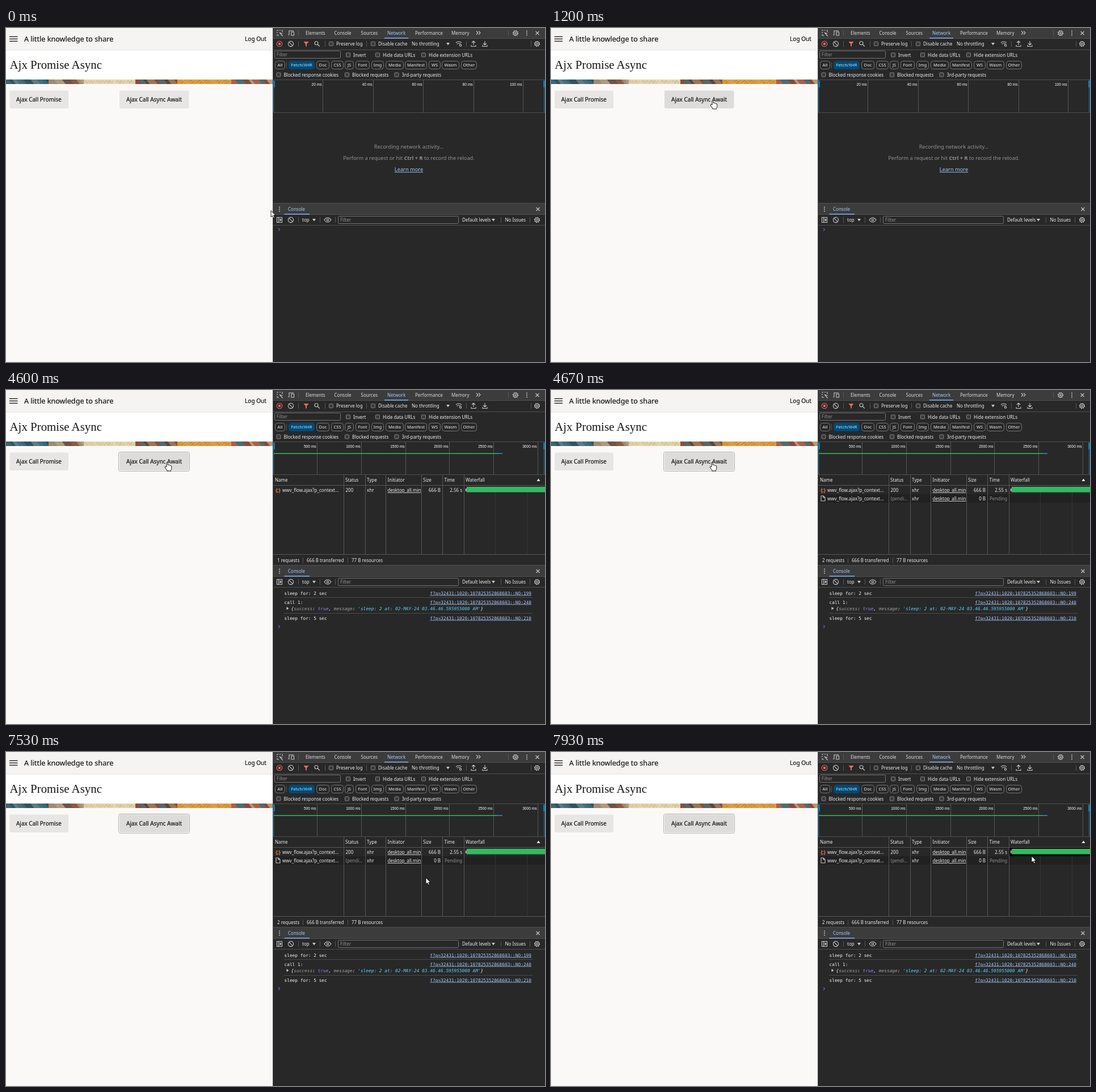
Animation, 950 px wide and 590 px high, one loop 8000 ms. Source, as an HTML page:

```html
<!DOCTYPE html>
<html lang="en">
<head>
<meta charset="utf-8">
<title>Ajx Promise Async</title>
<style>
html, body { margin: 0; width: 100%; height: 100%; overflow: hidden; background: #282828; }
svg { display: block; font: 8px "Noto Sans", "Open Sans", sans-serif; fill: #ececec; }
text { white-space: pre; }
.mono { font-family: "DejaVu Sans Mono", monospace; font-size: 7.82px; fill: #f4f4f4; }
.link { fill: #a8c7fa; text-decoration: underline; }
.dim { fill: #8f8f8f; }
.line { fill: none; stroke: #c7c7c7; stroke-width: 1.1; }
.rule { fill: none; }
.axis { font: 6.6px "Liberation Sans", Arial, sans-serif; fill: #fff; text-anchor: end; }
.end { text-anchor: end; }
.mid { text-anchor: middle; }
.page { fill: #161513; stroke: #161513; stroke-width: .2; }
.title { font: 20.9px "Liberation Serif", Times, serif; fill: #161513; }
</style>
</head>
<body>
<svg id="stage" width="950" height="590" viewBox="0 0 950 590"></svg>
<script>
const LOOP = 8000, STEP = 200 / 3;

const text = (x, y, s, cls = '', extra = '') => `<text x="${x}" y="${y}" class="${cls}" ${extra}>${s}</text>`;
const rect = (x, y, w, h, fill, extra = '') => `<rect x="${x}" y="${y}" width="${w}" height="${h}" fill="${fill}" ${extra}/>`;
const path = (d, extra = '') => `<path class="line" d="${d}" ${extra}/>`;
const rule = (d, color = '#565656') => `<path class="rule" d="${d}" stroke="${color}"/>`;
const ring = (x, y, r, extra = '') => `<circle class="line" cx="${x}" cy="${y}" r="${r}" ${extra}/>`;
const group = (id, body) => `<g id="${id}">${body}</g>`;
const each = (list, f) => list.map(f).join('');
const bars = (y, h, xs, color) => each(xs, x => rule(`M${x}.5 ${y}v${h}`, color));

// Toolbar icons and fields
const gear = (x, y) => ring(x, y, 3.5) + ring(x, y, 1.3) + ring(x, y, 4.6, 'stroke-dasharray="1.8 1.81"');
const cross = (x, y) => path(`M${x - 3} ${y - 3}l6 6m0 -6l-6 6`);
const dots = (x, y) => each([-3.5, 0, 3.5], d => `<circle cx="${x}" cy="${y + d}" r="1" fill="#c7c7c7"/>`);
const clear = (x, y) => ring(x, y, 4.6) + path(`M${x - 3.2} ${y - 3.2}l6.4 6.4`);
const drop = (x, y) => `<path d="M${x - 3} ${y - 2}h6l-3 4.5z" fill="#c7c7c7"/>`;
const tray = (x, arrow) => path(`M${x} 23v7${arrow}M${x - 4} 30v2.5h8v-2.5`);
const check = (x, y, label) => rect(x + .5, y - 3.5, 7, 7, '#3a3a3a', 'rx="1" stroke="#858585"') + text(x + 13, y + 3, label);
const field = (x, y, w) => rect(x + .5, y + .5, w, 13, '#282828', 'rx="2" stroke="#757575"') + text(x + 4, y + 9.7, 'Filter', 'dim');

function random(seed) {
  return () => (seed = (seed * 16807) % 2147483647) / 2147483647;
}

// Woven strip under the page title: leaning patches, or plain cloth with stitches
function banner() {
  const next = random(77);
  const zones = [
    [0, 75, ['#3d6671', '#33525d', '#5d7c80', '#456f79']],
    [75, 137, ['#a08a72', '#b09a80', '#6b5547', '#8c5a45']],
    [137, 228, ['#e3d2ac', '#e6d6b2'], '#b5a27c', 'q2 -7 4 -2t4 -2'],
    [228, 302, ['#85503c', '#56686a', '#5a463b', '#9a7457']],
    [302, 397, ['#dd9a42', '#e2a44c'], '#a8682f', 'l7 -5m-2 6l7 -5'],
    [397, 470, ['#a8614a', '#4d6c72', '#8a4a38', '#b39a7c']]
  ];
  let out = '';
  for (const [from, to, colors, thread, stitch] of zones) {
    out += rect(from, 91, to - from, 8, colors[0]);
    for (let x = from, i = 0; x < to; x += 5 + next() * 9, i++) {
      out += `<path d="M${x} 91H${to}V99H${Math.min(to, x + 6)}z" fill="${colors[i % colors.length]}"/>`;
      if (thread) out += path(`M${x} 97${stitch}`, `style="stroke:${thread};stroke-width:.6"`);
    }
  }
  return out;
}

const page = rect(0, 0, 470, 590, '#fbf9f8') + rect(0, 0, 470, 39, '#f5f4f2') +
  rect(0, 39, 470, 52, '#fff') + rect(0, 38.5, 470, 1, '#e3e1de') +
  each([15, 19, 23], y => rect(6, y - .3, 14.5, 1.3, '#161513')) +
  text(32, 24, 'A little knowledge to share', 'page', 'font-size="12.64"') +
  text(421, 23, 'Log Out', 'page', 'font-size="10.1"') +
  text(6.5, 72, 'Ajx Promise Async', 'title') +
  banner() +
  rect(6.5, 110.5, 103.5, 31.5, '#e8e6e4', 'rx="2"') +
  rect(198.5, 109.5, 125, 34, '#fbf9f8', 'id="focus" rx="3" stroke="#b4b2b0"') +
  rect(200, 110.5, 122.5, 31.5, '#e8e6e4', 'id="button" rx="2"') +
  text(18, 130, 'Ajax Call Promise', 'page', 'font-size="9.92"') +
  text(212, 130, 'Ajax Call Async Await', 'page', 'font-size="10"');

const tabs = [[528, 'Elements'], [578.5, 'Console'], [625.5, 'Sources'], [672, 'Network'], [721, 'Performance'], [785, 'Memory']];
const checks = [[569, 28, 'Preserve log'], [643, 28, 'Disable cache'], [599, 47.5, 'Invert'], [651, 47.5, 'Hide data URLs'],
  [732, 47.5, 'Hide extension URLs'], [476.5, 82.5, 'Blocked response cookies'], [597, 82.5, 'Blocked requests'],
  [684.5, 82.5, '3rd-party requests']];
const pills = [[474, 18, 'All'], [498, 46, 'Fetch/XHR'], [547, 23, 'Doc'], [573, 22, 'CSS'], [597, 16, 'JS'], [616, 25, 'Font'],
  [644, 22, 'Img'], [669, 32, 'Media'], [703, 39, 'Manifest'], [745, 21, 'WS'], [768, 31, 'Wasm'], [802, 28, 'Other']];

function pill([x, w, label]) {
  const on = label === 'Fetch/XHR', edge = on ? '#004a77' : '#757575';
  return rect(x + .5, 58.5, w - 1, 14, on ? edge : 'none', `rx="4" stroke="${edge}"`) +
    text(x + w / 2, 68.3, label, 'mid', `font-size="7.6" font-weight="500" fill="${on ? '#c2e7ff' : '#ececec'}"`);
}

const toolbars = rect(470, 0, 480, 590, '#282828') + rect(470, 0, 480, 18, '#3c3c3c') +
  rule('M470 18.5H950M470 38.5H950M470 91.5H950M470 149.5H950', '#4f4f4f') +
  each(tabs, ([x, s]) => text(x, 12, s, '', `fill="${s === 'Network' ? '#a8c7fa' : '#dcdcdc'}"`)) +
  rect(667, 17, 42, 1.5, '#7cacf8') +
  path('M481 13h-3v-2m0 -2v-2m0 -2v-1h2m2 0h2m2 0h1v3M487 14l-4.5 -5.5l5 1.5m-5 -1.5l5.5 6') +
  path('M500 12h-3M499 11v-6h8M503 7h4.5v6h-4.5z') +
  path('M829 5.5l3 3l-3 3m4 -6l3 3l-3 3') + gear(898, 9) + dots(918, 9) + cross(936.5, 9) +
  bars(4, 10, [515, 885]) +
  ring(482, 28, 4.8, 'style="stroke:#e46962"') + rect(480, 26, 4, 4, '#e46962') +
  clear(502, 28) + '<path d="M524.5 24h9l-3.5 4.5v4h-2v-4z" fill="#e46962"/>' +
  ring(547, 26.8, 3) + path('M549.3 29l3.5 3.5') +
  text(715, 31, 'No throttling') + drop(779, 28) +
  path('M793 26q5 -4 10 0m-8.3 2.5q3.3 -3 6.6 0') + ring(801, 30.5, 1.7) +
  tray(824, 'm-3 -4l3 -3l3 3') + tray(844, 'm-3 -3l3 3l3 -3') + gear(936, 28) +
  bars(23, 10, [515, 562, 635, 811, 925]) + bars(60, 11, [494]) +
  field(473, 40, 116) + each(checks, c => check(...c)) + each(pills, pill);

const scale = (xs, label) => bars(92, 57, xs) + each(xs, (x, i) => text(x - 1.5, 101.7, label(i + 1), 'axis'));
const overview = group('shortScale', scale([558, 647, 735, 824, 911], i => i * 20 + ' ms')) +
  group('longScale', scale([548, 626, 704, 781, 859, 937], i => i * 500 + ' ms') +
    rect(472, 111.5, 395, 1.5, '#34b960') + rect(867, 111.5, 8, 1.5, '#4a7fe0')) +
  each([471, 948], x => rect(x, 92, 1.2, 57, '#1b6f9c')) +
  each([471, 947], x => rect(x, 93, 3, 12, '#0b7bb5', 'rx="1"'));

const idle = group('idle', '<g class="mid" font-size="9.25" fill="#929292">' +
  text(710, 213, 'Recording network activity…') +
  text(710, 233.3, 'Perform a request or hit <tspan font-weight="bold">Ctrl + R</tspan> to record the reload.') +
  text(710, 253.3, 'Learn more', 'link') + '</g>');

const columns = [[474, 'Name'], [598, 'Status'], [636, 'Type'], [672.5, 'Initiator'], [735, 'Size'], [772.5, 'Time'], [810, 'Waterfall']];
const row = y => text(487, y, 'wwv_flow.ajax?p_context...') + text(636, y, 'xhr') +
  text(672.5, y, 'desktop_all.min', '', 'text-decoration="underline"');
const waiting = y => path(`M476 ${y - 8}h4l3 3v6h-7zM480 ${y - 8}v3h3`) +
  text(598.5, y, '(pendi...', 'dim') + text(766, y, '0 B', 'end') + text(773, y, 'Pending', 'dim');

const table = group('table',
  group('second', rect(471, 184, 479, 15, '#212121') + row(195) + waiting(195)) +
  each(columns, ([x, s]) => text(x, 162, s)) +
  '<path d="M935.5 161h6l-3 -4.5z"/>' + row(180) +
  group('pending', waiting(180) + rect(811, 173.5, 1.2, 6, '#8a8a8a') + bars(169, 122, [878], '#333')) +
  group('done', bars(169, 122, [862, 918], '#363636') + rect(808, 169, 142, 15, '#000', 'id="hover"') +
    rect(810, 174, 1.5, 5, '#ddd') + rect(812, 171, 138, 9.6, '#34b960') +
    text(479.5, 179.5, '{;}', 'mid', 'font-weight="bold" fill="#f0885c"') + text(598.5, 180, '200') + text(766, 180, '666 B', 'end') +
    text(804, 180, '2.56 s', 'end', 'id="time"')) +
  rule('M470 168.5H950M470 290.5H950') + bars(150, 140, [595, 633, 669, 732, 769, 807]) +
  text(478, 303.7, '1 requests', '', 'id="count"') +
  group('none', text(530, 303.7, '0 B transferred') + text(599, 303.7, '0 B resources') + bars(296, 10, [592])) +
  group('some', text(530, 303.7, '666 B transferred') + text(609, 303.7, '77 B resources') + bars(296, 10, [602])) +
  bars(296, 10, [523]));

const drawer = rect(470, 310, 480, 19, '#3c3c3c') + rule('M470 309.5H950M470 329.5H950M470 348.5H950', '#4f4f4f') +
  dots(482, 320) + text(497, 323, 'Console', '', 'fill="#a8c7fa"') + rect(490.5, 328, 44.5, 1.5, '#7cacf8') + cross(937.5, 320) +
  path('M477.5 334.5h9v9h-9zM480.5 334.5v9M483 337l2 2l-2 2z') + clear(502, 339) + text(522, 342, 'top') + drop(543, 339) +
  path('M561 339q6 -8 12 0q-6 8 -12 0z') + ring(567, 339, 1.7) +
  field(585, 332, 212) + text(804, 342, 'Default levels') + drop(859, 339) + text(879.5, 342, 'No Issues') + gear(936, 339) +
  bars(334, 10, [515, 553, 580, 872, 923]);

const log = (y, s, id) => text(490.5, y, s, 'mono') + text(926, y, 'f?p=32431:1020:107825352868603::NO:' + id, 'mono link end');
const span = (color, s) => `<tspan fill="${color}">${s}</tspan>`;
const messages = group('first', log(361.5, 'sleep for: 2 sec', 199)) +
  group('reply', rule('M490 366.5H928M490 394.5H928', '#4a4a4a') + log(377.5, 'call 1:', 240) +
    '<path d="M494.5 383l4 2.8l-4 2.8z" fill="#c7c7c7"/>' +
    text(502.5, 388.7, '{' + span('#a0a0a0', 'success') + ': ' + span('#9980ff', 'true') + ', ' + span('#a0a0a0', 'message') + ': ' +
      span('#5cd5fb', "'sleep: 2 at: 02-MAY-24 03.46.46.595955000 AM'") + '}', 'mono', 'font-style="italic"') +
    log(405.5, 'sleep for: 5 sec', 210)) +
  path('M480 -2.5l2.5 2.5l-2.5 2.5', 'id="prompt" style="stroke:#4a6fb5"');

const pointers = `<g fill="#fff" stroke="#000" stroke-width=".9" stroke-linejoin="round">
  <path id="arrow" d="M0 0V11.5L2.7 9L4.6 13.2L6.5 12.3L4.7 8.3H8.2z"/>
  <path id="hand" d="M-1 9V1.2Q0 -.4 1.2 1.2V5.5Q2.6 4.7 3.5 6Q4.9 5.3 5.7 6.7Q7.3 6.2 7.8 8V11.5Q7.5 13.5 6.5 14.5V16H-.2V14.5L-3.7 10Q-4.2 8 -2.7 8z"/></g>`;

document.getElementById('stage').innerHTML =
  toolbars + overview + idle + table + drawer + messages + page + rect(470, 0, 1, 590, '#4a4a4a') + pointers;

const el = id => document.getElementById(id);
const show = (id, on) => el(id).style.display = on ? '' : 'none';

// Pointer tip: step, x, y
const route = [[0, 467, 322.5], [3, 432, 275], [6, 345, 195], [9, 270, 142], [11, 262, 122], [13, 283, 118], [15, 298, 130],
  [16, 295, 132], [18, 285, 127], [28, 285, 127], [29, 284, 127], [106, 284, 127], [107, 314, 138], [109, 425, 185],
  [111, 590, 232], [112, 670, 239], [113, 740, 222], [115, 819, 181], [117, 839, 182], [119, 847, 183.8], [120, 847, 183.8]];

function tipAt(n) {
  const i = route.findIndex(p => p[0] > n), a = route[i - 1], b = route[i];
  const k = (n - a[0]) / (b[0] - a[0]);
  return [a[1] + (b[1] - a[1]) * k, a[2] + (b[2] - a[2]) * k];
}

function draw(ms) {
  const n = Math.min(119, Math.floor((ms + 4) / STEP));
  const [x, y] = tipAt(n);
  const over = x > 200 && x < 322 && y > 111 && y < 142;
  const pressed = n >= 29, logged = n >= 30, sent = n >= 31, answered = n >= 69, queued = n >= 70;

  show('focus', pressed);
  el('button').setAttribute('fill', pressed && !answered ? '#d2d0cf' : over || pressed ? '#dedcda' : '#e8e6e4');
  show('idle', !sent);
  show('table', sent);
  for (const id of ['pending', 'none', 'shortScale']) show(id, !answered);
  for (const id of ['done', 'some', 'reply', 'longScale']) show(id, answered);
  show('second', queued);
  show('hover', x > 471 && y > 169 && y < 184);
  el('time').textContent = queued ? '2.55 s' : '2.56 s';
  el('count').textContent = (queued ? 2 : 1) + ' requests';
  show('first', logged);
  el('prompt').setAttribute('transform', `translate(0 ${answered ? 418 : logged ? 375 : 356})`);

  show('hand', over);
  show('arrow', !over);
  el(over ? 'hand' : 'arrow').setAttribute('transform', `translate(${x} ${y})`);
}

const start = performance.now();
function tick() {
  draw((performance.now() - start) % LOOP);
  requestAnimationFrame(tick);
}
tick();
</script>
</body>
</html>
```
